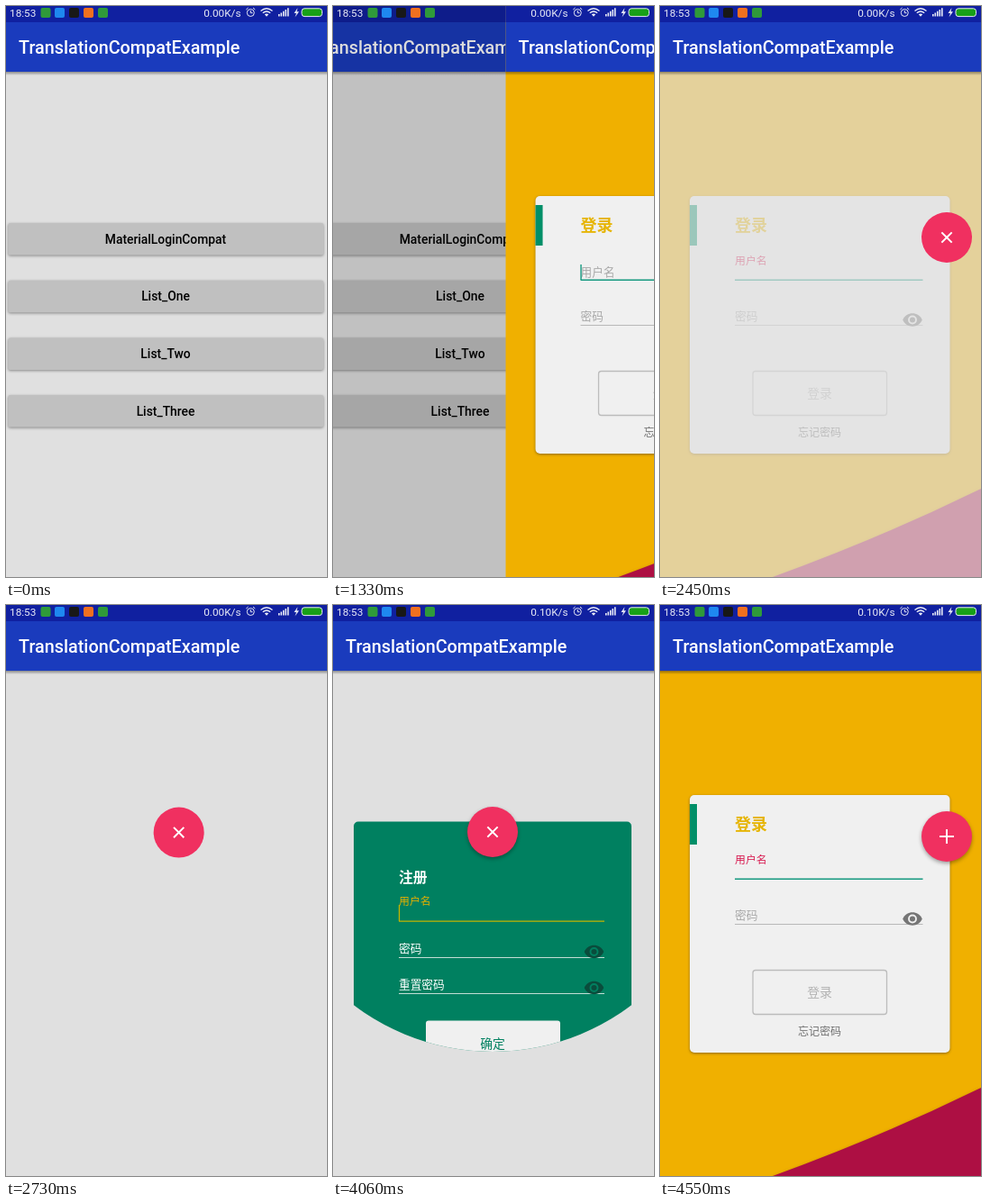
Recreate the animation shown at these times as an HTML page. Size 356 by 634 pixels, loop 4830 ms.

```html
<!DOCTYPE html>
<html lang="zh-CN">
<head>
<meta charset="utf-8">
<title>TranslationCompatExample</title>
<style>
  html, body { margin: 0; width: 100%; height: 100%; overflow: hidden; background: #e0e0e0; }
  svg { display: block; width: 100vw; height: 100vh; }
  text { font-family: Roboto, "Noto Sans CJK SC", "Noto Sans CJK", sans-serif; white-space: pre; }
  .mid { text-anchor: middle; }
  .hint { font-size: 12.7px; }
  .btn { font-size: 13.85px; }
  .card { filter: drop-shadow(0 1px 1.5px rgba(0, 0, 0, .4)); }
  .raised { filter: drop-shadow(0 2px 2px rgba(0, 0, 0, .35)); }
</style>
</head>
<body>
<svg viewBox="0 0 356 634" preserveAspectRatio="none">
  <defs>
    <linearGradient id="fade" x2="0" y2="1">
      <stop stop-opacity=".38"/><stop offset="1" stop-opacity="0"/>
    </linearGradient>
    <clipPath id="reveal"><circle id="hole" cx="177" cy="240"/></clipPath>
    <g id="bar">
      <rect y="73" width="356" height="4" fill="url(#fade)"/>
      <rect width="356" height="73" fill="#1a3bbd"/>
      <rect width="356" height="18" fill="#1020a0"/>
      <text x="14" y="53" font-size="19.8" font-weight="500" fill="#fff">TranslationCompatExample</text>
    </g>
    <g id="eye">
      <path d="M-10.8 0C-6.5-9.6 6.5-9.6 10.8 0C6.5 9.6-6.5 9.6-10.8 0Z"/>
      <circle r="4" fill="none" stroke-width="1.9" class="iris"/>
    </g>
  </defs>

  <g id="home">
    <rect width="356" height="634" fill="#e0e0e0"/>
    <g id="buttons"></g>
    <use href="#bar"/>
    <rect id="dim" width="356" height="634"/>
  </g>

  <g id="login">
    <rect width="356" height="634" fill="#f0b000"/>
    <path class="raised" d="M125 634Q246 590 356 536V640H125Z" fill="#ad0f43"/>
    <rect class="card" x="33" y="211" width="288.5" height="286" rx="5" fill="#f0f0f0"/>
    <rect x="33" y="221" width="8" height="45" fill="#008f68"/>
    <text x="83" y="250" font-size="18" font-weight="700" fill="#e6b400">登录</text>
    <text id="user" x="83">用户名</text>
    <path d="M83 304.2H291.5" stroke="#159a80" stroke-width="1.5"/>
    <path id="caret" d="M83.5 287V304" stroke="#159a80" stroke-width="1.4"/>
    <text class="hint" x="83" y="349.3" fill="#a8a8a8">密码</text>
    <path d="M83 354.5H291.5" stroke="#b8b8b8"/>
    <use href="#eye" x="280" y="348.5" fill="#757575" stroke="#f0f0f0" stroke-width="0"/>
    <rect x="103" y="405.5" width="148.5" height="49" rx="3" fill="none" stroke="#bcbcbc" stroke-width="1.3"/>
    <text class="mid btn" x="177" y="435" fill="#b2b2b2">登录</text>
    <text class="mid" x="177" y="478" font-size="12" fill="#707070">忘记密码</text>
    <use href="#bar"/>
  </g>

  <g id="register">
    <rect width="356" height="634" fill="#e0e0e0"/>
    <g clip-path="url(#reveal)">
      <rect x="23" y="240.5" width="308" height="306.5" rx="5" fill="#008060"/>
      <text x="73" y="307.5" font-size="15.8" font-weight="700" fill="#fff">注册</text>
      <text id="newUser" x="73">用户名</text>
      <path d="M73 351.2H301" stroke="#c4b400" stroke-width="1.3"/>
      <path id="newCaret" d="M73.5 333V351" stroke="#c4b400" stroke-width="1.3"/>
      <g fill="#fff" class="hint">
        <text x="73" y="385.8">密码</text>
        <text x="73" y="425.8">重置密码</text>
      </g>
      <path d="M73 391.5H301M73 431.5H301" stroke="#c2ded6"/>
      <g fill="#0a4c3c" stroke="#008060" stroke-width="0">
        <use href="#eye" x="289.5" y="385"/>
        <use href="#eye" x="289.5" y="425"/>
      </g>
      <rect x="103" y="461.5" width="149" height="50" rx="3" fill="#f0f0f0"/>
      <text class="mid btn" x="177" y="491.5" fill="#008060">确定</text>
    </g>
    <use href="#bar"/>
  </g>

  <g id="fab">
    <circle id="disc" r="28" fill="#f03060"/>
    <path id="plus" d="M-8 0H8M0-8V8" stroke="#fff" stroke-width="2"/>
  </g>

  <g id="status" font-size="11.8" fill="#e8eaf6">
    <text x="4" y="11.7">18:53</text>
    <text id="speed" x="260.5" y="11.7" text-anchor="end"></text>
    <rect x="38.5" y="2" width="11" height="11" rx="2" fill="#2f9a3a"/>
    <rect x="54" y="2" width="11" height="11" rx="2" fill="#1e88f0"/>
    <rect x="70" y="2" width="11" height="11" rx="2" fill="#181818"/>
    <rect x="86" y="2" width="11" height="11" rx="2" fill="#f07020"/>
    <rect x="102" y="2" width="11" height="11" rx="2" fill="#2f9a3a"/>
    <g fill="none" stroke="#e8eaf6">
      <circle cx="271.3" cy="7.5" r="4"/>
      <path d="M271.3 5V7.7H273.5M266.3 4L268.6 2M276.3 4L274 2"/>
      <path d="M282.5 5.5Q289 0 295.5 5.5M284.8 7.8Q289 4.2 293.2 7.8" stroke-width="1.3"/>
    </g>
    <path d="M286.8 9.2Q289 7.6 291.2 9.2L289 11.8Z"/>
    <path d="M302 9h1.6v2.5H302ZM304.5 7.5h1.6v4h-1.6ZM307 5.8h1.6v5.7H307ZM309.5 4h1.6v7.5h-1.6ZM312 2.3h1.6v9.2H312Z"/>
    <path d="M323.5 2L319.5 8H322L320.5 12.5L325 6.3H322.5Z"/>
    <rect x="328" y="2.8" width="22.5" height="8.8" rx="3" fill="#18a018" stroke="#e8eaf6"/>
  </g>
</svg>

<script>
const LOOP = 4830, STEP = 70;
const el = Object.fromEntries([...document.querySelectorAll('[id]')].map(e => [e.id, e]));
const set = (e, attrs) => { for (const k in attrs) e.setAttribute(k, attrs[k]); };
const show = (e, on) => e.setAttribute('visibility', on ? 'visible' : 'hidden');
const span = (t, from, to) => Math.min(1, Math.max(0, (t - from) / (to - from)));
const mix = (a, b, p) => a + (b - a) * p;
const smooth = p => p * p * (3 - 2 * p);

el.buttons.innerHTML = ['MaterialLoginCompat', 'List_One', 'List_Two', 'List_Three'].map((name, i) => {
  const y = 241 + i * 63.7;
  return `<rect class="card" x="2.5" y="${y}" width="349.5" height="35.5" rx="2" fill="#c0c0c0"/>
    <text class="mid btn" x="177" y="${y + 22.7}" font-weight="500">${name}</text>`;
}).join('');

// Floating hint: shrinks and rises above its line, then takes the accent colour.
function floatLabel(e, p, y0, y1, idle, accent) {
  set(e, { y: mix(y0, y1, p), 'font-size': mix(12.7, 11.9, p), fill: p > 0 ? accent : idle });
}

function revealRadius(t) {
  if (t < 2770 || t >= 4346) return 0;
  if (t < 3150) return mix(28, 307, span(t, 2770, 3150) ** 2);
  if (t < 3780) return 400;
  return mix(307, 28, span(t, 3846, 4346) ** 2);
}

function draw(t) {
  // The login page slides in over the dimming home page.
  const slide = 1 - (1 - span(t, 1274, 1574)) ** 3;
  const pageX = 356 * (1 - slide);
  set(el.home, { transform: `translate(${-78 * slide})` });
  set(el.dim, { opacity: .3 * slide });
  set(el.login, { transform: `translate(${pageX})` });
  show(el.home, slide < 1);
  show(el.login, slide > 0);
  floatLabel(el.user, smooth(span(t, 1540, 1750)), 299.7, 286.6, '#a8a8a8', '#d81b50');
  show(el.caret, slide > 0 && t < 2240);

  // The register page fades in and out; its card opens from the round button.
  const cover = span(t, 2200, 2560) * (1 - span(t, 4340, 4410));
  set(el.register, { opacity: cover });
  set(el.hole, { r: revealRadius(t) });
  floatLabel(el.newUser, smooth(span(t, 2940, 3150)), 345.8, 332.8, '#fff', '#e2b000');
  set(el.newCaret, { opacity: t >= 3640 && t < 4140 ? 1 : 0 });

  const moved = smooth(span(t, 2450, 2800)) * (1 - smooth(span(t, 4346, 4550)));
  set(el.fab, { transform: `translate(${mix(318, 177, moved) + pageX} ${mix(257, 252, moved)})` });
  set(el.plus, { transform: `rotate(${t >= 2450 && t < 4346 ? 45 : 0})` });
  set(el.disc, { class: t >= 2450 && t < 2800 ? '' : 'raised' });
  show(el.fab, slide > 0);

  el.speed.textContent = t < 2800 ? '0.00K/s' : '0.10K/s';
}

function tick() {
  draw(Math.floor(performance.now() % LOOP / STEP) * STEP);
  requestAnimationFrame(tick);
}
tick();
</script>
</body>
</html>
```
